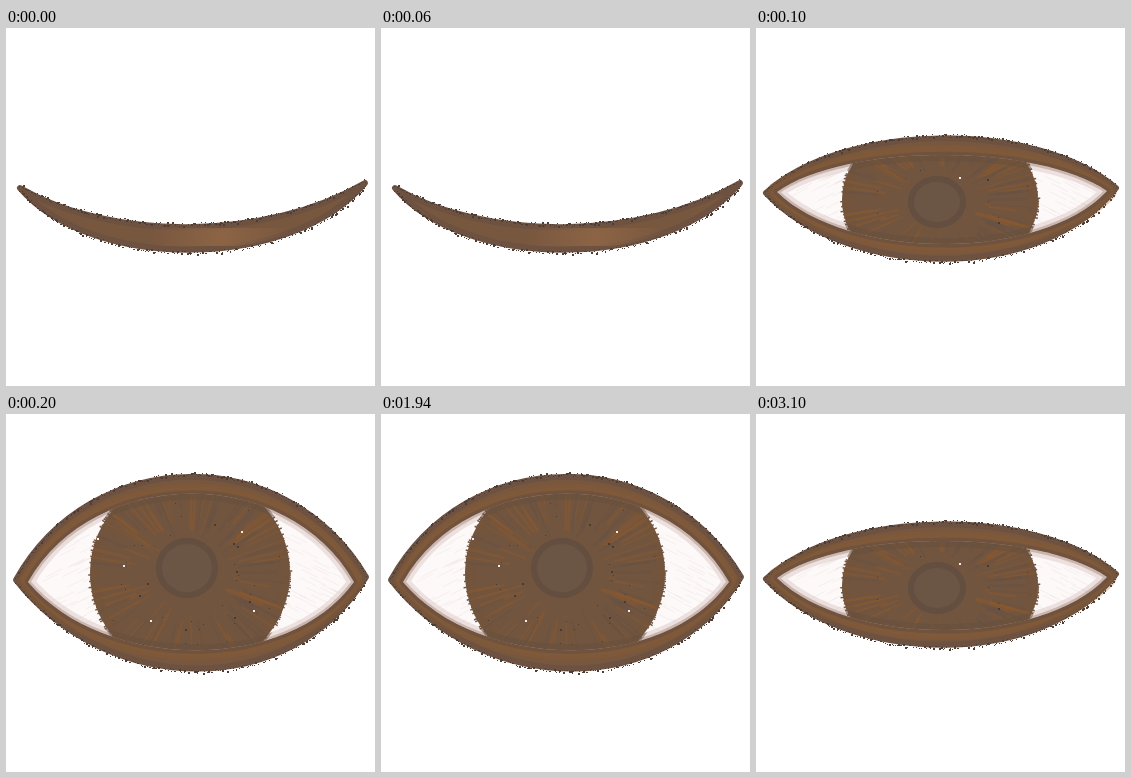
An HTML page with a canvas that plays this animation: 369 by 358 pixels, repeating every 3200 ms.

```html
<!DOCTYPE html>
<html>
<head>
<meta charset="utf-8">
<style>
  html, body { margin: 0; width: 100%; height: 100%; overflow: hidden; background: #fff; }
  canvas { display: block; }
</style>
</head>
<body>
<canvas id="stage" width="369" height="358"></canvas>
<script>
const ctx = document.getElementById('stage').getContext('2d');

// A lens is two cubic arcs between a left and a right corner.
const lens = (left, right, top, bottom) => ({ left, right, top, bottom });

const poses = {
  closed: {
    outer: lens([14, 160], [359, 155], [105, 213, 260, 213], [85, 243, 285, 243])
  },
  half: {
    outer: lens([10, 165], [360, 160], [88, 94, 280, 92], [92, 252, 285, 255]),
    inner: lens([21, 164], [351, 163], [90, 115, 280, 115], [92, 233, 285, 234]),
    iris: [184, 172, 100, 80],
    pupil: [181, 174, 29, 26],
    glints: [[203, 149]], specks: 14
  },
  open: {
    outer: lens([10, 166], [360, 163], [86, 30, 280, 28], [103, 284, 286, 285]),
    inner: lens([22, 168], [348, 168], [88, 52, 280, 49], [98, 258, 282, 260]),
    iris: [184, 159, 102, 101],
    pupil: [181, 154, 31, 30],
    glints: [[91, 124], [117, 151], [235, 117], [144, 206], [247, 196]], specks: 38
  }
};

let seed;
const random = () => (seed = (seed * 16807) % 2147483647) / 2147483647;
const spread = size => (random() * 2 - 1) * size;

function lensPath({ left, right, top, bottom }) {
  const path = new Path2D();
  path.moveTo(...left);
  path.bezierCurveTo(...top, ...right);
  path.bezierCurveTo(bottom[2], bottom[3], bottom[0], bottom[1], ...left);
  path.closePath();
  return path;
}

function ellipsePath([x, y, rx, ry]) {
  const path = new Path2D();
  path.ellipse(x, y, rx, ry, 0, 0, Math.PI * 2);
  return path;
}

function pointOn({ left, right }, arc, t) {
  const u = 1 - t;
  return [0, 1].map(i => u * u * u * left[i] + 3 * u * u * t * arc[i]
    + 3 * u * t * t * arc[i + 2] + t * t * t * right[i]);
}

function stroke(path, color, width) {
  ctx.strokeStyle = color;
  ctx.lineWidth = width;
  ctx.stroke(path);
}

function fill(path, color) {
  ctx.fillStyle = color;
  ctx.fill(path);
}

function dot(x, y, size, color) {
  ctx.fillStyle = color;
  ctx.fillRect(Math.round(x), Math.round(y), size, size);
}

function drawSkin(shape) {
  const path = lensPath(shape);
  fill(path, '#78573f');
  stroke(path, '#6d5241', 6);
  for (const [arc, side] of [[shape.top, -1], [shape.bottom, 1]]) {
    for (let i = 0; i < 230; i++) {
      const [x, y] = pointOn(shape, arc, i / 229);
      dot(x + spread(1), y + side * 3 + spread(1.6), random() < 0.2 ? 2 : 1, '#4d3d34');
    }
  }
}

function drawWhites(path) {
  fill(path, '#fdf9f9');
  for (let i = 0; i < 150; i++) {
    const onLeft = i % 2;
    const x = onLeft ? 22 + random() * 85 : 265 + random() * 80;
    const y = 90 + random() * 140;
    ctx.strokeStyle = 'rgba(222,205,203,0.25)';
    ctx.lineWidth = 1;
    ctx.beginPath();
    ctx.moveTo(x, y);
    ctx.lineTo(x + 16, y + (onLeft ? -8 : 8));
    ctx.stroke();
  }
  stroke(path, 'rgba(205,180,174,0.35)', 13);
  stroke(path, 'rgba(170,140,128,0.5)', 5);
}

function ray([x, y, rx, ry], angle, from, to, color, width) {
  const c = Math.cos(angle) * rx, s = Math.sin(angle) * ry;
  ctx.strokeStyle = color;
  ctx.lineWidth = width;
  ctx.beginPath();
  ctx.moveTo(x + c * from, y + s * from);
  ctx.lineTo(x + c * to, y + s * to);
  ctx.stroke();
}

function drawIris({ iris, pupil, glints, specks }) {
  const [x, y, rx, ry] = iris;
  fill(ellipsePath([x, y, rx - 2, ry - 2]), '#72553f');
  for (let i = 0; i < 300; i++) {
    ray(iris, i * Math.PI / 150, 0.88, 0.98 + spread(0.025), '#73543c', 1.5);
  }
  for (let i = 0; i < 110; i++) {
    const from = 0.36 + random() * 0.35;
    const color = random() < 0.55 ? 'rgba(143,89,43,0.38)' : 'rgba(98,82,70,0.4)';
    ray(iris, random() * Math.PI * 2, from, Math.min(0.97, from + 0.2 + random() * 0.4),
      color, 1 + random() * 2);
  }
  for (let i = 0; i < specks; i++) {
    const angle = random() * Math.PI * 2, r = 0.42 + random() * 0.5;
    dot(x + Math.cos(angle) * rx * r, y + Math.sin(angle) * ry * r,
      random() < 0.3 ? 2 : 1, '#493a30');
  }
  const disc = ellipsePath(pupil);
  fill(disc, '#6b5545');
  const [px, py, prx, pry] = pupil;
  stroke(ellipsePath([px, py, prx - 3, pry - 3]), '#634e40', 6);
  glints.forEach(([gx, gy]) => dot(gx, gy, 2, '#f6eeec'));
}

function drawEye(pose) {
  const inner = lensPath(pose.inner);
  stroke(inner, 'rgba(137,91,52,0.3)', 20);
  stroke(inner, 'rgba(137,91,52,0.25)', 14);
  stroke(inner, '#70533e', 7);
  ctx.save();
  ctx.clip(inner);
  drawWhites(inner);
  drawIris(pose);
  ctx.clip(ellipsePath(pose.iris));
  stroke(inner, 'rgba(103,80,62,0.55)', 12);
  ctx.restore();
}

function drawClosedLid({ outer }) {
  ctx.save();
  ctx.clip(lensPath(outer));
  const sheen = ctx.createRadialGradient(215, 211, 2, 215, 211, 70);
  sheen.addColorStop(0, 'rgba(151,107,72,0.65)');
  sheen.addColorStop(1, 'rgba(151,107,72,0)');
  ctx.fillStyle = sheen;
  ctx.fillRect(140, 200, 150, 18);
  ctx.restore();
}

function draw(name) {
  const pose = poses[name];
  seed = 4711;
  ctx.fillStyle = '#fff';
  ctx.fillRect(0, 0, 369, 358);
  ctx.lineJoin = 'round';
  drawSkin(pose.outer);
  if (pose.inner) drawEye(pose);
  else drawClosedLid(pose);
}

function poseAt(ms) {
  if (ms < 100) return 'closed';
  return ms < 200 || ms >= 3100 ? 'half' : 'open';
}

const start = performance.now();
let shown;
function tick() {
  const name = poseAt((performance.now() - start) % 3200);
  if (name !== shown) draw(shown = name);
  requestAnimationFrame(tick);
}
tick();
</script>
</body>
</html>
```
